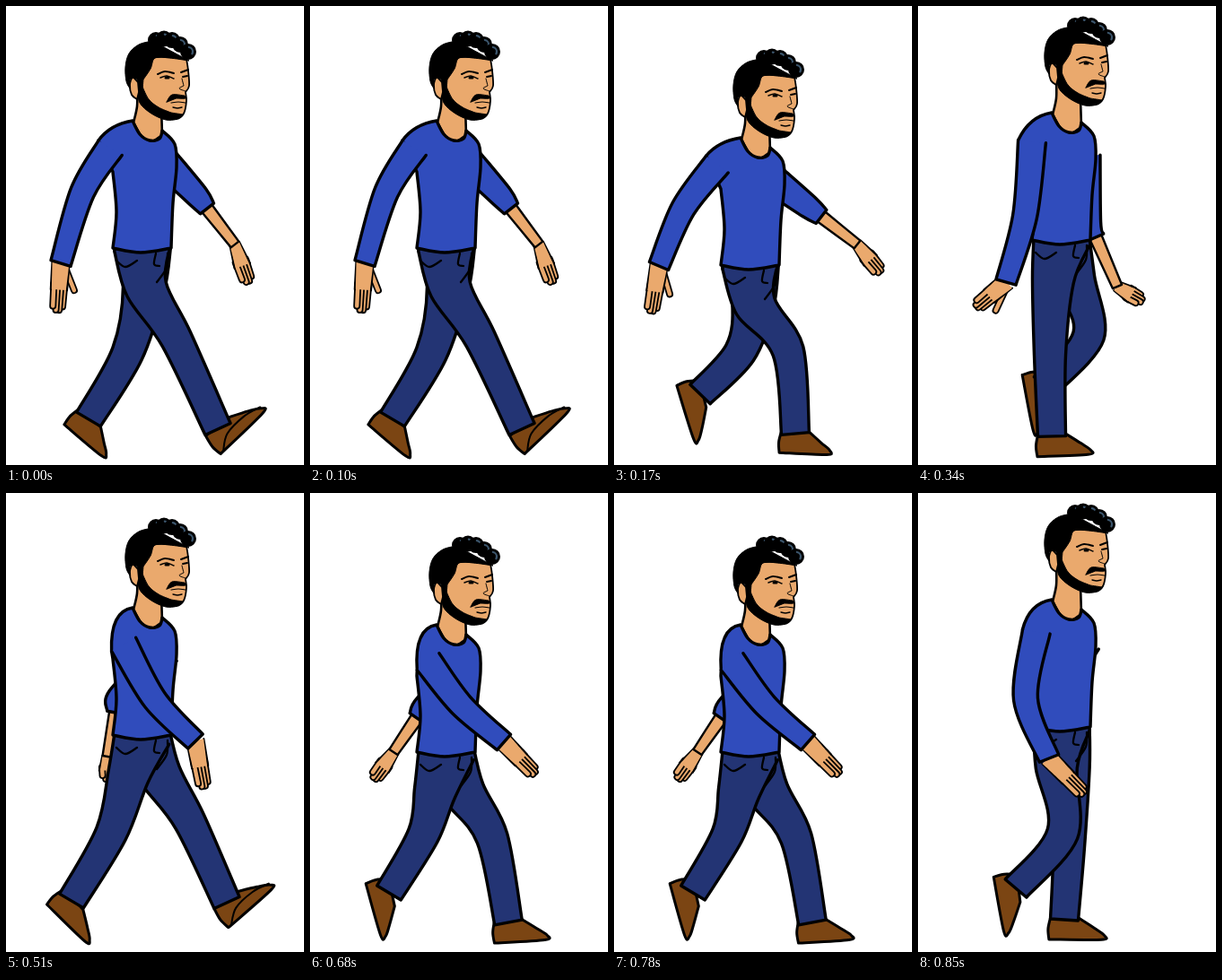
Recreate the animation shown at these times as an HTML page with a canvas. Size 332 by 512 pixels, loop 1.02 s.

```html
<!DOCTYPE html>
<html lang="en">
<head>
<meta charset="utf-8">
<title>Walking man</title>
<style>
html, body { margin: 0; overflow: hidden; background: #fff; }
canvas { display: block; }
</style>
</head>
<body>
<canvas id="stage" width="332" height="512"></canvas>
<script>
const ctx = document.getElementById('stage').getContext('2d');
const STEP = 170;
const INK = '#000', SKIN = '#eaa96d', SHIRT = '#304cbc', JEANS = '#233474', SHOE = '#7b4513', SHINE = '#3c566d';

// The body bobs and sways twice per loop, once for each stride.
const bodyShift = [[0, 0], [0, 19], [8, -9]];
const headShift = [[0, 0], [0, 20], [8, -16]];

// Joints of each limb: elbow (or cuff), wrist, fingertip; knee, ankle, toe.
const poses = [
  { arm: '85,208 61,287 57,344', farArm: '224,226 255,266 271,312', leg: '190,372 236,472 288,453', farLeg: '135,388 92,461 111,500' },
  { arm: '77,226 50,290 41,345', farArm: '231,235 271,266 299,300', leg: '194,385 202,477 240,496', farLeg: '140,387 96,433 90,485' },
  { arm: '119,235 98,308 62,338', farArm: '198,258 222,313 253,331', leg: '147,390 149,480 192,497', farLeg: '190,368 141,424 129,476' },
  { arm: '166,231 211,277 221,332', farArm: '122,245 113,294 113,324', leg: '117,380 73,455 91,500', farLeg: '205,367 246,457 297,441' },
  { arm: '169,237 216,278 253,316', farArm: '119,251 93,289 69,322', leg: '126,382 88,446 81,495', farLeg: '203,385 221,479 264,495' },
  { arm: '120,230 146,296 187,338', farArm: '165,225 162,260 162,290', leg: '161,380 109,441 97,491', farLeg: '168,395 163,476 207,496' }
];

const points = text => text.trim().split(/\s+/).map(p => p.split(',').map(Number));
const add = (a, b) => [a[0] + b[0], a[1] + b[1]];
const toward = (from, to) => Math.atan2(to[1] - from[1], to[0] - from[0]);
const polar = (angle, length) => [Math.cos(angle) * length, Math.sin(angle) * length];

// Catmull-Rom curve through the points, continuing the path.
function smooth(path, pts) {
  for (let i = 0; i < pts.length - 1; i++) {
    const a = pts[i], b = pts[i + 1], before = pts[i - 1] || a, after = pts[i + 2] || b;
    path.bezierCurveTo(
      a[0] + (b[0] - before[0]) / 6, a[1] + (b[1] - before[1]) / 6,
      b[0] - (after[0] - a[0]) / 6, b[1] - (after[1] - a[1]) / 6, ...b);
  }
}

// "|" turns the point before it into a corner.
function curve(text) {
  const path = new Path2D();
  let last = null;
  for (const run of text.split('|')) {
    const pts = points(run);
    if (last) pts.unshift(last);
    else path.moveTo(...pts[0]);
    smooth(path, pts);
    last = pts[pts.length - 1];
  }
  return path;
}

function paint(path, fill, width = 3.4, ink = INK) {
  if (fill) {
    ctx.fillStyle = fill;
    ctx.fill(path);
  }
  ctx.strokeStyle = ink;
  ctx.lineWidth = width;
  ctx.stroke(path);
}

const shape = (fill, text, width) => {
  const path = curve(text);
  path.closePath();
  paint(path, fill, width);
};
const line = (text, width = 2.3) => paint(curve(text), null, width);

function placed([x, y], angle, draw) {
  ctx.save();
  ctx.translate(x, y);
  ctx.rotate(angle);
  draw();
  ctx.restore();
}

// Points beside each joint, half a width away from the bone.
function side(joints, widths, sign) {
  return joints.map((p, i) => {
    const angle = toward(joints[i - 1] || p, joints[i + 1] || p);
    return add(p, polar(angle + sign * Math.PI / 2, widths[i] / 2));
  });
}

// Sleeve or trouser leg: open where it joins the body, closed at the cuff.
function limb(fill, joints, widths, ink) {
  const path = new Path2D();
  const outer = side(joints, widths, 1), inner = side(joints, widths, -1).reverse();
  path.moveTo(...outer[0]);
  smooth(path, outer);
  path.lineTo(...inner[0]);
  smooth(path, inner);
  paint(path, fill, ink);
}

function finger(from, to) {
  const path = new Path2D();
  path.moveTo(...from);
  path.lineTo(...to);
  paint(path, null, 8);
  paint(path, null, 4.4, SKIN);
}

function hand(wrist, tip, width, thumb) {
  const length = Math.hypot(tip[0] - wrist[0], tip[1] - wrist[1]);
  placed(wrist, toward(wrist, tip), () => {
    if (thumb) finger([8, -7], [29, -17]);
    for (let i = -1.5; i <= 1.5; i++) finger([length * 0.4, i * 4], [length - 3 - Math.abs(i) * 4, i * 3.6]);
    const palm = new Path2D();
    palm.moveTo(-1, -width / 2);
    palm.lineTo(length * 0.52, -9);
    palm.moveTo(length * 0.52, 9);
    palm.lineTo(-1, width / 2);
    paint(palm, null, 2.4);
    ctx.fillStyle = SKIN;
    ctx.fill(curve(`-1,${-width / 2} | ${length * 0.52},-8 | ${length * 0.52},8 | -1,${width / 2}`));
  });
}

function shoe(ankle, tip) {
  const angle = toward(ankle, tip) - 0.42;
  const toe = Math.hypot(tip[0] - ankle[0], tip[1] - ankle[1]) * 0.92;
  placed(ankle, angle, () => {
    shape(SHOE, `-15,-4 -18,10 -17,22 | ${toe - 3},22 ${toe},17 ${toe * 0.75},9 16,-2`, 3);
    if (angle < -0.3) line(`-13,22 4,11 ${toe * 0.6},10 ${toe},15`, 2);
  });
}

function leg([knee, ankle, toe], body, bias) {
  const waist = add(body, [152, 270]);
  const hip = add(waist, [bias + 0.28 * (knee[0] - waist[0]), 46]);
  shoe(ankle, toe);
  limb(JEANS, [waist, hip, knee, ankle], [63, 46, 35, 31]);
}

function farArm([cuff, wrist, tip], body) {
  const elbow = add(cuff, polar(toward(wrist, cuff), 17));
  hand(wrist, tip, 11, false);
  limb(SKIN, [cuff, wrist], [14, 11], 2.4);
  limb(SHIRT, [add(body, [179, 176]), elbow, cuff], [32, 25, 19]);
}

function torsoAndArm([elbow, wrist, tip], body) {
  // The shoulder rolls forward with the wrist.
  const reach = wrist[0] - body[0];
  const joints = [add(body, [110 + reach * 0.1, 154 + reach * 0.07]), elbow, wrist];
  const widths = [31, 27, 23];
  const [sx, sy] = side(joints, widths, 1)[0];

  placed(body, 0, () => {
    line('123,284 133,291 146,284');
    line('167,276 165,288 171,290');
    line('180,276 179,292 168,308');
    shape(SKIN, '146,92 146,112 142,130 | 157,152 174,144 | 173,112', 2.6);
    const torso = new Path2D();
    torso.moveTo(141, 128);
    torso.quadraticCurveTo(116, 132, sx - body[0], sy - body[1]);
    torso.lineTo(119, 185);
    smooth(torso, points('119,185 123,230 119,270'));
    smooth(torso, points('119,270 150,275 184,270'));
    smooth(torso, points('184,270 186,220 190,180 188,154 174,139'));
    smooth(torso, points('174,139 171,148 160,150 149,143 141,128'));
    paint(torso, SHIRT);
  });
  hand(wrist, tip, 19, reach < 110);
  limb(SHIRT, joints, widths);
}

function head(shift) {
  placed(shift, 0, () => {
    shape(SKIN, '148,78 | 164,58 201,59 | 203,72 204,89 200,96 | 201,106 198,120 190,126 175,124 158,112 148,96', 1.8);
    shape(INK, '147,92 149,108 162,120 178,127 190,126 197,121 | 184,119 | 170,113 159,104 152,90', 1);
    shape(INK, '179,107 185,99 199,100 | 200,103 190,103', 1);
    shape(INK, '138,92 134,84 133,68 137,53 148,43 163,39 | 204,61 | 182,58 166,58 161,70 153,82 | 151,98 147,94 | 146,82 138,82', 1);
    shape(SKIN, '147,85 141,80 138,88 140,99 146,104 | 148,96', 1.8);
    for (let i = 0; i < 5; i++) {
      const x = 167 + 9 * i, y = 36.5 + 1.6 * (i - 1) ** 2;
      const curl = new Path2D(), shine = new Path2D();
      curl.arc(x, y, 8, 0, 7);
      shine.arc(x, y, 5, -1.4, 0.5);
      paint(curl, INK, 2);
      paint(shine, null, 2.2, SHINE);
    }
    line('169,76 177,73 187,75', 2);
    line('195,74 203,71', 2);
    line('172,80 179,78 187,81', 1.4);
    line('178,80 181,80', 3);
    line('197,79 202,78', 2);
    line('196,81 198,89 | 193,92 200,95', 1);
    line('184,108 192,107 200,108', 1.2);
    line('186,113 191,114 196,113', 1.4);
  });
}

function draw() {
  const index = Math.floor(performance.now() / STEP) % poses.length;
  const pose = poses[index], body = bodyShift[index % 3];
  ctx.fillStyle = '#fff';
  ctx.fillRect(0, 0, 332, 512);
  ctx.lineJoin = ctx.lineCap = 'round';
  farArm(points(pose.farArm), body);
  leg(points(pose.farLeg), body, 6);
  leg(points(pose.leg), body, -6);
  torsoAndArm(points(pose.arm), body);
  head(headShift[index % 3]);
  requestAnimationFrame(draw);
}
draw();
</script>
</body>
</html>
```
